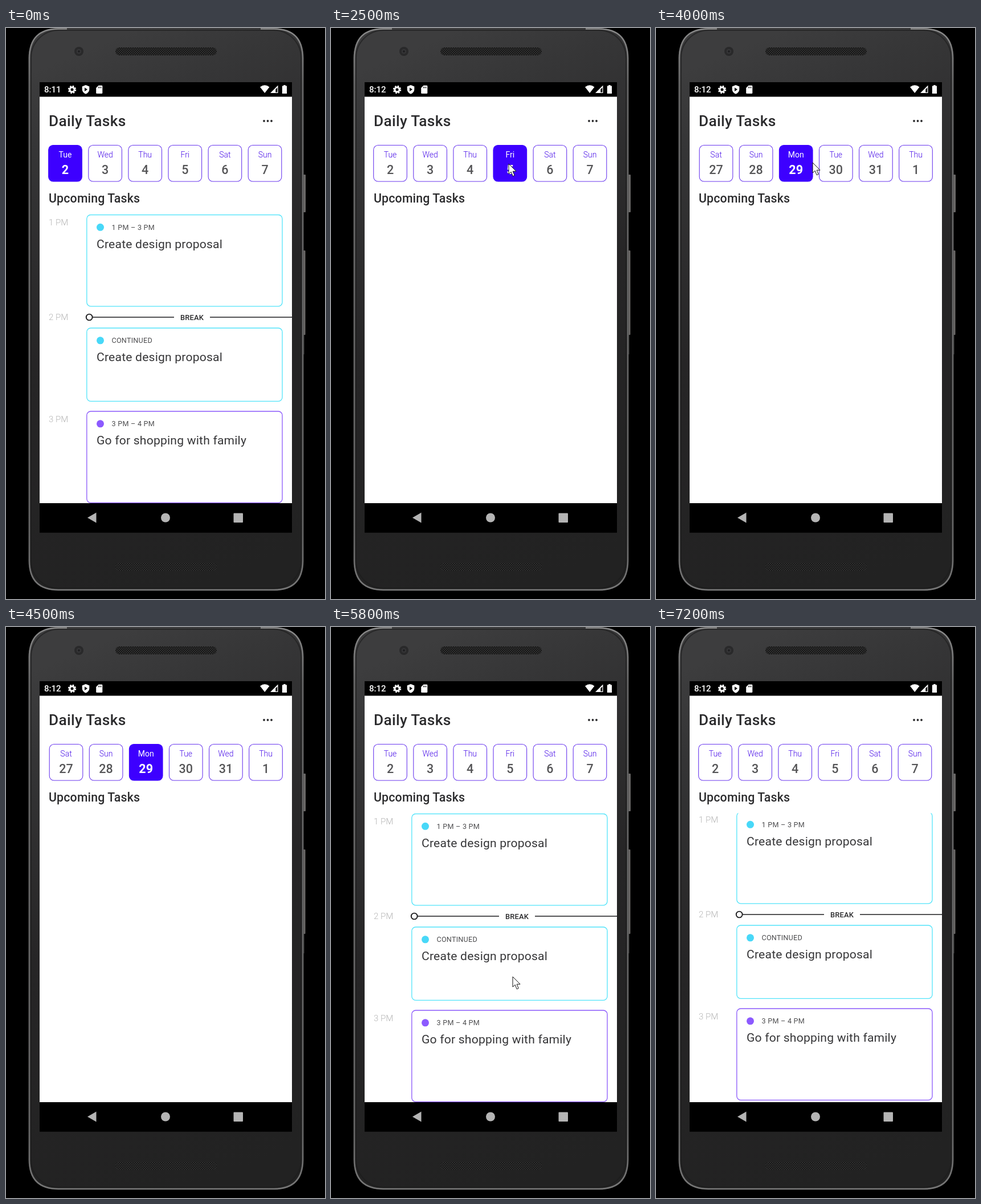
An HTML page for the animation above (7300 ms loop, 560x1001 px).

```html
<!DOCTYPE html>
<html lang="en">
<head>
<meta charset="utf-8">
<title>Daily Tasks</title>
<style>
  html, body { margin: 0; width: 100%; height: 100%; overflow: hidden; background: #000; }
  svg { display: block; width: 100%; height: 100%; }
  text { font-family: Roboto, sans-serif; fill: #2b2b2d; }
  .clock { font-size: 15px; font-weight: 500; fill: #fff; }
  .title { font-size: 26.2px; font-weight: 500; letter-spacing: .34px; }
  .sub { font-size: 21.3px; font-weight: 500; letter-spacing: .18px; }
  .hour { font-size: 15px; font-weight: 300; fill: #b6b6b6; }
  .slot { font-size: 12.6px; letter-spacing: .25px; fill: #4c4c4e; }
  .task { font-size: 21.1px; letter-spacing: .2px; fill: #363638; }
  .break { font-size: 12.9px; font-weight: 500; letter-spacing: .2px; }
  .card { fill: #fff; stroke-width: 1.3; }
  .chip text { text-anchor: middle; }
  .chip rect { fill: #fff; stroke: #6a39ee; stroke-width: 1.1; }
  .chip .day { font-size: 14px; font-weight: 300; fill: #4a12e8; }
  .chip .num { font-size: 21.5px; font-weight: 500; fill: #555557; }
  .chip.on rect { fill: #3d00ff; stroke: #3d00ff; }
  .chip.on text { fill: #fff; }
  .chip.on .day { font-weight: 400; }
  .chip.on .num { font-weight: 700; }
</style>
</head>
<body>
<svg viewBox="0 0 560 1001">
  <defs>
    <linearGradient id="body" x1=".4" x2=".6" y2="1">
      <stop offset="0" stop-color="#3d3d3e"/>
      <stop offset=".12" stop-color="#363637"/>
      <stop offset=".5" stop-color="#262526"/>
      <stop offset="1" stop-color="#222"/>
    </linearGradient>
    <linearGradient id="rim" x2="0" y2="1">
      <stop offset="0" stop-color="#8a8a8a"/>
      <stop offset=".1" stop-color="#666"/>
      <stop offset=".9" stop-color="#666"/>
      <stop offset="1" stop-color="#777"/>
    </linearGradient>
    <pattern id="mesh" width="4" height="4" patternUnits="userSpaceOnUse">
      <rect width="4" height="4" fill="#303030"/>
      <circle cx="1" cy="1" r="1.1" fill="#121212"/>
      <circle cx="3" cy="3" r="1.1" fill="#121212"/>
    </pattern>
    <clipPath id="strip"><rect x="70" y="200" width="420" height="74"/></clipPath>
    <clipPath id="view"><rect x="59" y="326.5" width="443" height="530"/></clipPath>
  </defs>
  <rect width="560" height="1001"/>

  <g fill="#6c6a69">
    <rect x="521" y="257" width="5" height="66" rx="1"/>
    <rect x="521" y="390" width="4.5" height="148" rx="1"/>
    <rect x="521" y="538" width="2.5" height="34" fill="#444"/>
  </g>
  <rect x="39.5" y="0" width="483" height="986.5" rx="52" fill="url(#body)"/>
  <path d="M107 1.5H92Q41 1.5 41 53V934Q41 985 92 985H470Q521 985 521 934V53Q521 1.5 470 1.5H447" fill="none" stroke="url(#rim)" stroke-width="2.6"/>
  <rect x="44" y="4" width="474" height="978" rx="48" fill="none" stroke="#1b1b1b" stroke-width="2" opacity=".6"/>
  <rect x="192" y="34" width="178" height="14" rx="7" fill="url(#mesh)"/>
  <rect x="192" y="937.5" width="178" height="14" rx="7" fill="url(#mesh)"/>
  <circle cx="128" cy="41" r="8" fill="#29292a"/>
  <circle cx="128" cy="41" r="4" fill="#363638"/>
  <circle cx="128" cy="41" r="2" fill="#1f1f21"/>

  <rect x="59" y="95" width="443" height="789.5"/>
  <rect x="59" y="120.5" width="443" height="712.5" fill="#fff"/>
  <text id="clock" class="clock" x="67" y="113.2">8:11</text>
  <g fill="#fff">
    <g fill="none" stroke="#fff">
      <circle cx="116" cy="108" r="4" stroke-width="3"/>
      <circle cx="116" cy="108" r="6" stroke-width="2.4" stroke-dasharray="2.6 2.112"/>
    </g>
    <path d="M140 100l6.3 2.6v5.2q0 5-6.3 8q-6.3-3-6.3-8v-5.2z"/>
    <path d="M138 104.5l5 3.3-5 3.3z" fill="#000"/>
    <path d="M162.5 100.7H168q1.3 0 1.3 1.3v11.5q0 1.5-1.3 1.5H159.5q-1.3 0-1.3-1.5V105z"/>
    <path d="M162.5 103v2.5M164.7 103v2.5M166.9 103v2.5" stroke="#000"/>
    <path d="M446 103.5q8.2-6.5 16.4 0L454.2 114z"/>
    <path d="M464 114L477.5 100.5V114z"/>
    <path d="M473.3 107.5L476.3 104.5V112.7H473.3z" fill="#000"/>
    <path d="M487.2 100h3.4v1.5h2.4v13.5h-8.2v-13.5h2.4z"/>
  </g>

  <text class="title" x="75" y="171.8">Daily Tasks</text>
  <g fill="#2b2b2d">
    <circle cx="453" cy="163" r="1.9"/><circle cx="459.5" cy="163" r="1.9"/><circle cx="466" cy="163" r="1.9"/>
  </g>
  <g clip-path="url(#strip)"><g id="chips"></g></g>
  <text class="sub" x="75" y="306.3">Upcoming Tasks</text>

  <g id="list"><g clip-path="url(#view)"><g id="rows">
    <g fill="none" stroke="#1d1d1f" stroke-width="1.7">
      <circle cx="146.2" cy="507" r="5.4" stroke-width="1.9"/>
      <path d="M152 507H295M358 507H502"/>
    </g>
    <text class="break" x="306" y="511.5">BREAK</text>
  </g></g></g>

  <rect x="59" y="833" width="443" height="51.5"/>
  <g fill="#b4b4b4">
    <path d="M143 858.5L158.5 849.5V867.5z"/>
    <circle cx="280" cy="858.5" r="8"/>
    <rect x="399.5" y="850.5" width="16.5" height="16.5" rx="1"/>
  </g>
  <path id="cursor" d="M0 0V18L4.2 14.2L7.2 21.8L10.2 20.4L7.2 13.2H13Z" fill="#fff" stroke="#111" stroke-linejoin="round"/>
</svg>
<script>
const LOOP = 7300, STEP = 100, PITCH = 70.1;
const DAYS = ['Tue', 'Wed', 'Thu', 'Fri', 'Sat', 'Sun', 'Mon'];
const $ = id => document.getElementById(id);

function add(parent, tag, attrs, label) {
  const el = document.createElementNS('http://www.w3.org/2000/svg', tag);
  for (const key in attrs) el.setAttribute(key, attrs[key]);
  if (label !== undefined) el.textContent = label;
  return parent.appendChild(el);
}

const chips = Array.from({ length: 31 }, (_, i) => {
  const x = 104 + i * PITCH;
  const g = add($('chips'), 'g', { class: 'chip' });
  add(g, 'rect', { x: x - 29.3, y: 205.5, width: 58.6, height: 63.5, rx: 8 });
  add(g, 'text', { class: 'day', x, y: 227 }, DAYS[i % 7]);
  add(g, 'text', { class: 'num', x, y: 256.4 }, (i + 1) % 31 + 1);
  return g;
});

function card(y, height, slot, task, line, dot) {
  const rows = $('rows');
  add(rows, 'rect', { class: 'card', x: 141.8, y, width: 343.2, height, rx: 7, stroke: line });
  add(rows, 'circle', { cx: 165.5, cy: y + 21.8, r: 6.5, fill: dot });
  add(rows, 'text', { class: 'slot', x: 185.5, y: y + 26.3 }, slot);
  add(rows, 'text', { class: 'task', x: 159, y: y + 58.3 }, task);
}
card(327.5, 160.3, '1 PM – 3 PM', 'Create design proposal', '#52e4fa', '#48d8f8');
card(526, 128.3, 'CONTINUED', 'Create design proposal', '#52e4fa', '#48d8f8');
card(672, 160.3, '3 PM – 4 PM', 'Go for shopping with family', '#8a58fb', '#8c5aff');
[345.8, 512.3, 690.8].forEach((y, i) => add($('rows'), 'text', { class: 'hour', x: 75, y }, `${i + 1} PM`));

// Keys are [time, value, ...]; values between keys are linear.
function tween(keys, t, k = 1) {
  const n = keys.findIndex(key => key[0] > t);
  if (n === 0) return keys[0][k];
  if (n < 0) return keys[keys.length - 1][k];
  const a = keys[n - 1], b = keys[n];
  return a[k] + (b[k] - a[k]) * (t - a[0]) / (b[0] - a[0]);
}

const fade = [[1599, 1], [1600, 0], [2570, 0], [3200, 1], [3799, 1], [3800, 0], [4560, 0], [5200, 1]];
const strip = [[2900, 0], [3000, 40], [3100, 110], [3200, 520], [3400, 1560], [3500, 1751],
  [4700, 1751], [4800, 1640], [4900, 1452], [5200, 620], [5400, 120], [5500, 0]];
const scroll = [[6100, 0], [6400, 3]];
const moves = [
  [[1200, 320, 530], [1500, 108, 242], [1600, 108, 242], [1900, 169, 234], [2200, 312, 238], [2700, 312, 238]],
  [[3600, 200, 300], [3700, 247, 240], [3800, 247, 240], [4000, 275, 236], [4300, 300, 240]],
  [[5000, 498, 240], [5400, 498, 240], [5800, 319, 613], [6100, 319, 613], [6400, 325, 420], [6800, 340, 500]]
];

function draw(now) {
  const t = Math.floor(now % LOOP / STEP) * STEP;
  const shown = tween(fade, t);
  const picked = t < 2200 ? 0 : t < 3800 ? 3 : 27;
  $('clock').textContent = t < 1500 ? '8:11' : '8:12';
  chips.forEach((chip, i) => chip.classList.toggle('on', i === picked));
  $('chips').setAttribute('transform', `translate(${-tween(strip, t)} 0)`);
  $('list').setAttribute('opacity', shown);
  $('list').setAttribute('transform', `translate(0 ${-10 * (1 - shown)})`);
  $('rows').setAttribute('transform', `translate(0 ${-tween(scroll, t)})`);

  const path = moves.find(m => t >= m[0][0] && t <= m[m.length - 1][0]);
  $('cursor').setAttribute('visibility', path ? 'visible' : 'hidden');
  if (path) $('cursor').setAttribute('transform', `translate(${tween(path, t)} ${tween(path, t, 2)})`);
}

const start = performance.now();
function tick() {
  draw(performance.now() - start);
  requestAnimationFrame(tick);
}
tick();
</script>
</body>
</html>
```
